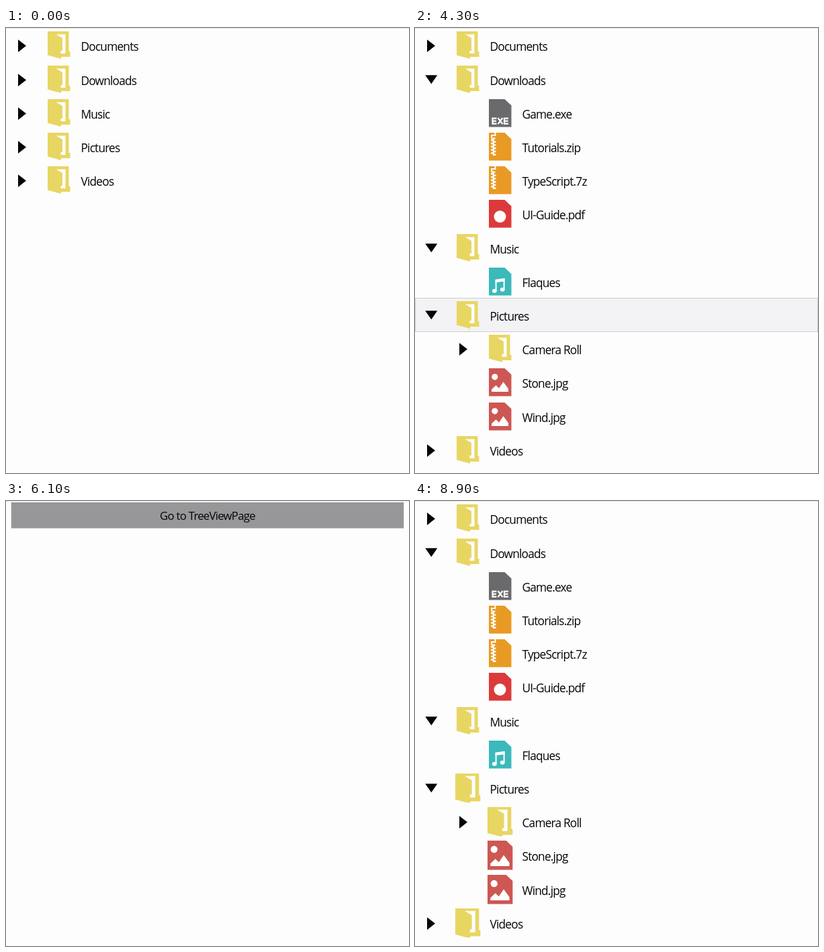
Write an HTML page that moves like this. It is 600 px wide and 663 px high and loops after 9000 ms.

```html
<!DOCTYPE html>
<html lang="en">
<head>
<meta charset="utf-8">
<title>File tree</title>
<style>
  html, body { margin: 0; width: 100%; height: 100%; overflow: hidden; background: #fefdfe; }
  body > svg { display: block; width: 600px; height: 663px; }
  text { font: 17.3px "Open Sans", "Noto Sans", sans-serif; letter-spacing: -.8px; fill: #050505; }
  .selected { fill: #f3f2f4; stroke: #cfcecf; }
</style>
</head>
<body>
<svg viewBox="0 0 600 663">
  <defs>
    <g id="folder">
      <path fill="#e8d662" d="M0 0H31.5V30H33.5V38H20V41L0 35.5Z"/>
      <path fill="#fefdfe" d="M12.5 4.5H26.5V33H19.5V29H22V10Z"/>
    </g>
    <path id="sheet" d="M0 0H23.5L33.5 9.5V41.5H0Z"/>
    <g id="exe">
      <use href="#sheet" fill="#6a6a6c"/>
      <path fill="none" stroke="#fff" stroke-width="2.2" d="M11.5 28.6H5.5V36.6H11.5M5.5 32.6H11M13.5 28L20.5 37.2M20.5 28L13.5 37.2M29 28.6H23V36.6H29M23 32.6H28.5"/>
    </g>
    <g id="zip">
      <use href="#sheet" fill="#e99a24"/>
      <g fill="none" stroke="#fff">
        <path stroke-width="2" d="M4 8.5V4H9.5V0M4 8.5H9.5"/>
        <path stroke-width="4" stroke-dasharray="2.4 2.4" d="M5 10V34M8.5 12.4V34"/>
        <path stroke-width="2" d="M6.8 9V34"/>
      </g>
    </g>
    <g id="pdf">
      <use href="#sheet" fill="#dc3a3a"/>
      <circle cx="16.5" cy="25" r="9" fill="#fff"/>
    </g>
    <g id="audio">
      <use href="#sheet" fill="#3bb9bb"/>
      <g transform="translate(.6 .7)" fill="#fff">
        <path fill="none" stroke="#fff" stroke-width="2" d="M10 34V18.5L22 16.5V31.5"/>
        <path d="M9 17L23 15V19.5L9 21.5Z"/>
        <ellipse cx="7.7" cy="34" rx="3.4" ry="2.9"/>
        <ellipse cx="19.6" cy="32" rx="3.4" ry="2.9"/>
      </g>
    </g>
    <g id="image">
      <use href="#sheet" fill="#cd5753"/>
      <circle cx="8.8" cy="12.8" r="4.6" fill="#fff"/>
      <path fill="#fff" d="M4 35V31.5L10.5 25.3L15 29.8L21.5 20.3L29 30.5V35Z"/>
    </g>
    <path id="closed" fill="#050505" d="M18 16.2L30 25.6L18 35Z"/>
    <path id="open" fill="#050505" d="M15.2 18.3H33.3L24.3 31.2Z"/>
  </defs>
  <rect width="600" height="1" fill="#e9e8ec"/>
  <g id="page"></g>
</svg>
<script>
const LOOP = 9000, ROW = 50.2, TOP = 1.3;
const page = document.getElementById("page");

const tree = [
  { name: "Documents" },
  { name: "Downloads", files: [["Game.exe", "exe"], ["Tutorials.zip", "zip"], ["TypeScript.7z", "zip"], ["UI-Guide.pdf", "pdf"]] },
  { name: "Music", files: [["Flaques", "audio"]] },
  { name: "Pictures", files: [["Camera Roll", "folder"], ["Stone.jpg", "image"], ["Wind.jpg", "image"]] },
  { name: "Videos" }
];

// Remaining distance of a page sliding up into place.
const slide = (distance, elapsed) => distance * Math.exp(-elapsed / 105);

// Enlarged icons fill their box and lose a strip at the top and bottom.
const drawIcon = (icon, enlarged) => enlarged
  ? `<svg x="59.8" y="3" width="37.8" height="43.5" viewBox="0 1.25 33.5 38.5"><use href="#${icon}"/></svg>`
  : `<use href="#${icon}" x="62" y="4"/>`;

function drawRow(index, name, icon, { indent = 0, arrow, selected, enlarged }) {
  return `<g transform="translate(0 ${Math.round(TOP + index * ROW)})">
    ${selected ? `<rect class="selected" x=".5" y="-.5" width="599" height="50"/>` : ""}
    <g transform="translate(${indent} 0)">
      ${arrow ? `<use href="#${arrow}"/>` : ""}
      ${drawIcon(icon, enlarged)}
      <text x="111.5" y="33">${name}</text>
    </g></g>`;
}

function drawTree(openFolders, selectedName, reloaded) {
  const rows = [];
  const add = (name, icon, options) => {
    const index = rows.length;
    rows.push(drawRow(index, name, icon, { ...options, enlarged: reloaded && index >= 8 }));
  };
  for (const { name, files = [] } of tree) {
    const isOpen = openFolders.includes(name);
    add(name, "folder", { arrow: isOpen ? "open" : "closed", selected: name === selectedName });
    if (!isOpen) continue;
    for (const [file, icon] of files)
      add(file, icon, { indent: 48, arrow: icon === "folder" && "closed" });
  }
  return rows.join("");
}

const drawButton = (fill) => `<rect y="1.5" width="600" height="39.7" fill="${fill}"/>
  <text x="300" y="28" text-anchor="middle">Go to TreeViewPage</text>`;

const allOpen = ["Downloads", "Music", "Pictures"];
const scenes = [
  { at: 0, html: drawTree([]) },
  { at: 600, html: drawTree(allOpen.slice(0, 1), "Downloads") },
  { at: 2200, html: drawTree(allOpen.slice(0, 2), "Music") },
  { at: 3600, html: drawTree(allOpen, "Pictures") },
  { at: 4800, html: drawButton("#cfcecf"), distance: 139 },
  { at: 6100, html: drawButton("#979698"), transform: "translate(7.8 .5) scale(.974)" },
  { at: 6800, html: "" },
  { at: 7000, html: drawTree(allOpen, null, true), distance: 3 }
];

let current;
function render(now) {
  const time = now % LOOP;
  const scene = scenes.findLast(({ at }) => time >= at);
  if (scene !== current) page.innerHTML = scene.html;
  current = scene;
  const offset = slide(scene.distance || 0, time - scene.at);
  page.setAttribute("transform", scene.transform || `translate(0 ${offset < .5 ? 0 : offset})`);
}

const start = performance.now();
function tick() {
  render(performance.now() - start);
  requestAnimationFrame(tick);
}
tick();
</script>
</body>
</html>
```
